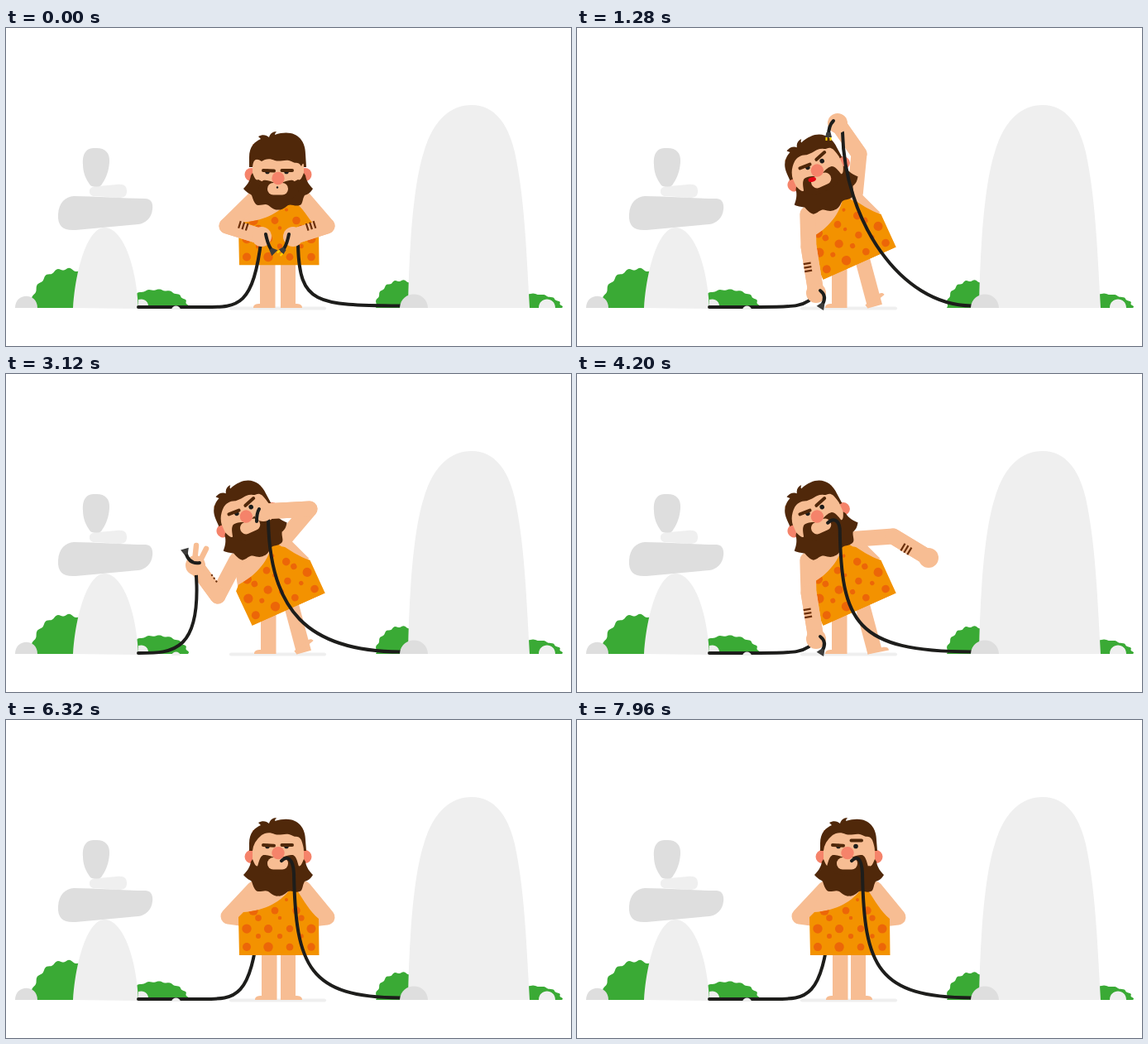
Animation, 683 px wide and 384 px high, one loop 8000 ms. Source, as an HTML page:

```html
<!DOCTYPE html>
<html lang="en">
<head>
<meta charset="utf-8">
<title>Caveman with cables</title>
<style>
html,body{margin:0;width:100%;height:100%;overflow:hidden;background:#fff}
svg{display:block;width:100vw;height:100vh}
.skin{fill:#f7bd93}
.limb{fill:none;stroke:#f7bd93;stroke-width:19;stroke-linecap:round;stroke-linejoin:round}
.cable{fill:none;stroke:#1d1d1b;stroke-width:4;stroke-linecap:round}
.mark{fill:none;stroke:#6b2f0a;stroke-width:2.2}
.brow{fill:none;stroke:#50280a;stroke-width:4;stroke-linecap:round}
.hair{fill:#50280a}
.pink{fill:#f5836a}
.light{fill:#efefef}
.dark{fill:#dedede}
.green{fill:#3aaa35}
</style>
</head>
<body>
<svg viewBox="0 0 683 384">
  <defs>
    <clipPath id="cut"><path d="M-48 0L-49-46L-43-52C-22-53 0-62 12-78H22C30-66 38-52 48-44L48.5 0Z"/></clipPath>
  </defs>

  <path id="bushes" class="green"/>
  <path class="light" d="M160 328C167 326 172 330 172 336H160Z"/>
  <path class="dark" d="M11 338C11 319 38 319 38 338Z"/>
  <path class="light" d="M81 338C84 290 99 241 119 241C142 241 158 290 160 339ZM101 197C101 192 106 191 112 191L134 189C143 188 146 191 146 197C146 203 143 205 136 205L108 203C103 203 101 201 101 197Z"/>
  <path class="dark" d="M63 225C64 210 72 204 82 203C110 203 140 206 168 206C175 206 178 211 177 219C176 230 168 236 160 237L84 244C70 245 62 240 63 225ZM93 165C92 150 98 145 107 145C119 144 126 150 125 162C124 175 120 183 115 190C113 192 104 192 102 190C96 182 93 174 93 165Z"/>
  <path class="light" d="M486 338C487 270 492 190 505 150C515 115 535 93 563 93C590 93 607 115 615 150C627 205 629 270 633 338ZM644 338C644 324 664 324 664 338Z"/>
  <rect class="light" x="270" y="336.5" width="117" height="4" rx="2"/>

  <path id="cableBack" class="cable"/>
  <path id="legL" class="skin" d="M307 280h18.5v58h-26.5c0-4 3-5 8-5z"/>
  <g id="legR" class="skin">
    <path d="M-9-3H9V55H-9Z"/>
    <path id="foot" d="M0 0V-5H18C23-5 26-4 26 0Z"/>
  </g>
  <path id="backL" class="limb"/>
  <path id="backR" class="limb"/>
  <g id="torso">
    <path class="skin" d="M-46-46L-36-82Q-30-92-20-92H20Q30-92 34-82L48-46Z"/>
    <g id="tunic" clip-path="url(#cut)"><rect x="-50" y="-80" width="100" height="81" fill="#f39200"/></g>
  </g>
  <path id="midL" class="limb"/>
  <path id="midR" class="limb"/>
  <g id="head">
    <g id="ears" class="pink"><circle cx="-32.5" r="8"/><circle cx="32.5" r="8"/></g>
    <path class="skin" d="M-31-32H31V10C31 32-31 32-31 10Z"/>
    <path class="hair" d="M-33 6C-34 13-38 18-42 22C-38 27-34 28-32 30C-30 36-28 42-24 42C-18 42-16 40-12 42C-8 45-5 48 0 47.5C5 48 8 45 12 42C16 40 20 44 26 42C30 41 29 35 32 30C36 29 39 27 42 22C38 18 34 13 33 6L31 3C29 8 27 13 24 11Q14 17 0 17Q-14 17-24 11C-27 13-29 8-31 3Z"/>
    <g id="face">
      <path class="hair" d="M-4 1C-8 0-12-3-18-2C-22 0-23 5-25 12C-18 26 18 26 25 12C23 5 22 0 18-2C12-3 8 0 4 1Z"/>
      <rect class="skin" x="-13" y="1" width="25" height="14.5" rx="7"/>
      <circle id="mouth" cx="-1" cy="6.5" r="1.2" fill="#1d1d1b"/>
      <ellipse id="tongue" cx="-10" cy="3" rx="4.8" ry="2.8" fill="#e30613" transform="rotate(10 -10 3)"/>
      <circle id="eyeL" cy="-12.6" r="2.8" fill="#1d1d1b"/>
      <circle cx="10" cy="-12.6" r="2.8" fill="#1d1d1b"/>
      <path id="brows" class="brow"/>
      <circle class="pink" cy="-4.5" r="7.7"/>
    </g>
    <path id="hair" class="hair"/>
  </g>
  <path id="foreL" class="limb"/>
  <path id="foreR" class="limb"/>
  <path id="marksL" class="mark"/>
  <path id="marksR" class="mark"/>
  <path id="cableL" class="cable"/>
  <path id="cableR" class="cable"/>
  <g id="handL">
    <path id="fingers" class="limb" style="stroke-width:6.5"/>
    <circle class="skin" r="12"/>
  </g>
  <circle id="handR" class="skin" r="12"/>
  <path id="tipL" class="cable"/>
  <path id="tipR" class="cable"/>
  <path id="plugL" d="M-3-2L4-5V5L-3 2Z" fill="#3c3c3b"/>
  <g id="plugR">
    <path d="M-4-2.5L2-4V4L-4 2.5Z" fill="#3c3c3b"/>
    <path d="M2-2.5H6M2 2.5H6" stroke="#ffd500" stroke-width="2"/>
  </g>
  <path class="dark" d="M476 338C477 316 509 316 510 338Z"/>
  <path class="light" d="M200 340C201 334 210 334 211 340Z"/>
</svg>
<script>
const LOOP = 8000, GROUND = 337;
const el = {};
document.querySelectorAll('[id]').forEach(n => el[n.id] = n);
const set = (id, name, value) => el[id].setAttribute(name, value);
const show = (id, on) => { el[id].style.display = on ? '' : 'none'; };

// Eased 0..1 between two times.
function ramp(t, from, to) {
  const x = Math.min(1, Math.max(0, (t - from) / (to - from)));
  return x * x * (3 - 2 * x);
}

// curl and tip place the loose cable end relative to the hand
const pose = (elbow, hand, curl, tip, mark) => [elbow, hand, curl, tip, mark];
const left = {
  join: pose([267, 239], [309, 252], [8, 12], [13, 17], [6, 9]),
  floor: pose([280, 264], [289, 320], [14, 4], [7, 15], [-5, 9]),
  lift: pose([256, 268], [229, 231], [-8, -1], [-12, -16], [-9, 2]),
  behind: pose([269, 237], [306, 242], [8, 12], [13, 17], [-9, 0])
};
const right = {
  join: pose([388, 239], [347, 252], [-8, 12], [-13, 17], [-6, 9]),
  high: pose([341, 152], [315, 115], [-11, 3], [-11, 15], [-9, 0]),
  bite: pose([367, 163], [311, 166], [-8, 2], [-8, 12], [-9, 0]),
  aside: pose([382, 196], [425, 222], [-8, 2], [-8, 12], [-5, 10]),
  hip: pose([376, 217], [356, 228], [-8, 2], [-8, 12], [-9, 0]),
  behind: pose([388, 238], [352, 242], [-8, 2], [-8, 12], [-9, 0])
};

// start, end, next pose, height of the hand's arc
const leftMoves = [[60, 600, 'floor'], [2520, 2840, 'lift'], [3360, 3760, 'floor'], [5940, 6280, 'behind']];
const rightMoves = [[60, 600, 'high'], [1740, 2160, 'bite'], [3400, 3920, 'aside', 74],
  [4280, 4620, 'hip'], [5940, 6280, 'behind']];

function arm(poses, moves, t) {
  let now = poses.join;
  for (const [from, to, name, arc = 0] of moves) {
    const e = ramp(t, from, to);
    now = now.map((pair, i) => pair.map((v, j) => v + (poses[name][i][j] - v) * e));
    now[1][1] -= arc * Math.sin(Math.PI * e);
  }
  return now;
}

function bush(cx, rx, ry) {
  let d = `M${cx - rx} 338`;
  for (let i = 1; i <= 80; i++) {
    const a = Math.PI * (1 - i / 80), wave = 1 + 0.03 * Math.sin(18 * a);
    d += `L${cx + rx * wave * Math.cos(a)} ${338 - ry * wave * Math.sin(a)}`;
  }
  return d + 'Z';
}
set('bushes', 'd', bush(73, 42, 47) + bush(182, 38, 22) + bush(478, 31, 33) + bush(634, 38, 17));

// Large spots in rows of four, small ones between them.
for (let row = 0; row < 3; row++) for (let col = 0; col < 4; col++) {
  const x = -39 + 26 * col + (row > 1 ? 8 : 0), y = -10 - 22 * row;
  const big = 5 + 0.8 * Math.sin(col * 2 + row), small = 3 + Math.sin(col * 3 + row);
  el.tunic.insertAdjacentHTML('beforeend',
    `<g fill="#ec6608"><circle cx="${x}" cy="${y}" r="${big}"/><circle cx="${x + 14}" cy="${y - 13}" r="${small}"/></g>`);
}

function drawArm(side, shoulder, [elbow, hand, , , [off, len]], back) {
  const [ex, ey] = elbow, [hx, hy] = hand;
  const whole = `M${shoulder}L${elbow}L${hand}`;
  set('back' + side, 'd', whole);
  set('mid' + side, 'd', whole);
  set('fore' + side, 'd', `M${elbow}L${hand}`);
  set('hand' + side, 'transform', `translate(${hand})`);
  const size = Math.hypot(hx - ex, hy - ey);
  const ux = (hx - ex) / size, uy = (hy - ey) / size;
  let marks = '';
  for (const i of [-1, 0, 1]) {
    const along = size * 0.43 + i * 4.6;
    const point = s => `${ex + ux * along + uy * s} ${ey + uy * along - ux * s}`;
    marks += `M${point(off - len / 2)}L${point(off + len / 2)}`;
  }
  set('marks' + side, 'd', marks);
  show('back' + side, back);
  for (const part of ['mid', 'fore', 'hand']) show(part + side, !back);
  show('marks' + side, !back && len > 0.5);
}

function drawTip(side, [, [hx, hy], [bx, by], [cx, cy]], tip, plug) {
  const grip = side === 'L' ? 5 : -5;
  set('tip' + side, 'd', `M${hx + grip} ${hy - 3}Q${hx + bx} ${hy + by} ${hx + cx} ${hy + cy}`);
  const turn = Math.atan2(cy - by, cx - bx) * 180 / Math.PI;
  set('plug' + side, 'transform', `translate(${hx + cx} ${hy + cy}) rotate(${turn})`);
  show('tip' + side, tip);
  show('plug' + side, plug);
}

function drawHead(t, lean, down, wink) {
  set('ears', 'transform', `translate(0 ${5 * down})`);
  set('face', 'transform', `translate(${-2 * wink} ${14 * down})`);
  set('eyeL', 'cx', -13 + 4 * lean + 2 * wink);
  const l = -14 - 1.5 * lean, r = -14 - 5.6 * wink;
  set('brows', 'd', `M-18 ${l}L-5 ${l + 0.6}M4.5 ${r - 3 * lean}L17 ${r - 7 * lean}`);
  set('mouth', 'opacity', down);
  show('tongue', t > 700 && t < 1760);
  const f = 15 * down, side = -7 + 3 * down;
  set('hair', 'd', `M-35 ${side}L-35-16C-35-29-28-35-21-38L-24-41C-19-44-14-43-11-40C-10-44-7-47-2-47`
    + `Q-4-45-4-43C20-51 33-38 33-20L34 ${side}H31Q31-12 28 ${f - 20}C25 ${f - 26} 21 ${f - 23} 18 ${f - 25}`
    + `C10 ${f - 30} 4 ${f - 25} -4 ${f - 27}C-10 ${f - 30} -16 ${f - 29} -20 ${f - 26}Q-30-18-31 ${side}Z`);
}

function draw(t) {
  const stand = ramp(t, 5940, 6280), bend = ramp(t, 60, 600), lean = bend - stand;
  const down = 1 - ramp(t, 60, 500), wink = ramp(t, 7240, 7400);
  const open = ramp(t, 2600, 2840) - ramp(t, 3360, 3560);
  const backL = t > 6100, backR = t > 4470, bitten = t >= 3400;

  const bob = 0.5 * stand * Math.sin((t - 6280) / 260);
  const px = 330 + 11.5 * lean, py = 284 + 0.5 * lean + 2.5 * down + bob, turn = -24 * lean;
  const c = Math.cos(turn * Math.PI / 180), s = Math.sin(turn * Math.PI / 180);
  const world = (x, y) => [px + x * c - y * s, py + x * s + y * c];
  const body = `translate(${px} ${py}) rotate(${turn})`;
  set('torso', 'transform', body);
  set('head', 'transform', `${body} translate(-1 ${-119 + 4.5 * down})`);
  drawHead(t, lean, down, wink);

  const tap = 0.5 + 0.5 * Math.cos(t / 440 * 2 * Math.PI);
  set('legL', 'transform', `translate(${bend + stand} 0)`);
  set('legR', 'transform', `translate(${341 + 5 * lean - wink} 283) rotate(${-15 * lean})`);
  set('foot', 'transform', `translate(-9 55) rotate(${lean * (5 - 32 * tap)})`);

  const l = arm(left, leftMoves, t), r = arm(right, rightMoves, t);
  drawArm('L', world(-30 - 3 * lean, -80), l, backL);
  drawArm('R', world(30, -80), r, backR);
  set('fingers', 'd', `M-1-5L${open} ${-5 - 19 * open}M5-4L${5 + 8 * open} ${-4 - 16 * open}`);

  const [hx, hy] = l[1];
  const wire = `M160 ${GROUND}H${Math.max(160, hx - 68)}`
    + `C${hx - 28} ${GROUND} ${hx - 10 + 20 * open} ${GROUND} ${hx} ${hy}`;
  set('cableL', 'd', wire);
  set('cableBack', 'd', wire);
  show('cableL', !backL);
  show('cableBack', backL);

  // The right cable hangs from the hand, later from the mouth.
  const chin = world(18 - 3 * wink, -99);
  const [sx, sy] = bitten ? chin : [r[1][0] + 6, r[1][1] + 11];
  const drop = 336 - sy, slack = 24 * ramp(t, 3400, 3700);
  let start = `M${sx} ${sy}`;
  if (bitten) {
    const [mx, my] = world(3 + 4.6 * lean - wink, -114 + 2.7 * lean);
    start = `M${mx} ${my}C${mx + 7} ${my - 7} ${sx - 1} ${my - 3} ${sx} ${sy}`;
  }
  set('cableR', 'd', `${start}C${sx + 2} ${sy + drop * (1.2 - drop / 300) + slack / 3}`
    + ` ${sx + 14 + drop * drop / 800 - slack} 335 477 335.5`);

  drawTip('L', l, !backL, !backL);
  drawTip('R', r, !bitten, t < 2080);
}

const begin = performance.now();
function frame() {
  draw((performance.now() - begin) % LOOP);
  requestAnimationFrame(frame);
}
frame();
</script>
</body>
</html>
```
